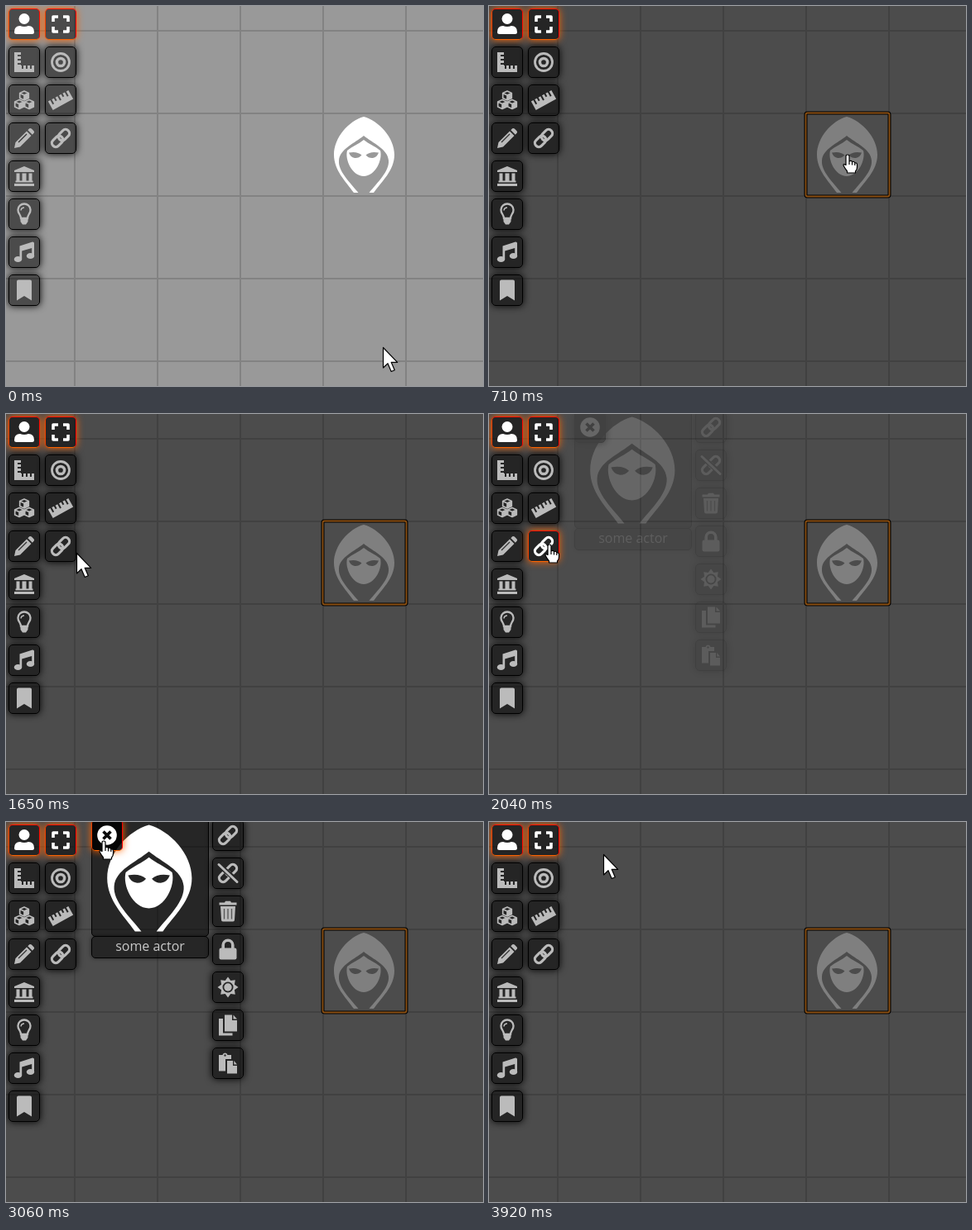
Animation of 576 by 460 pixels, one loop 4 s. Source, as an HTML page:

```html
<!DOCTYPE html>
<html lang="en">
<head>
<meta charset="utf-8">
<title>Token controls</title>
<style>
html, body { margin: 0; width: 100%; height: 100%; overflow: hidden; }
body { background: #4c4c4c; }
#stage { position: absolute; left: 0; top: 0; width: 576px; height: 460px; overflow: hidden; animation: scene 4s step-end infinite; }
svg { position: absolute; overflow: visible; }
.btn {
  position: absolute; box-sizing: border-box; width: 38px; height: 38px;
  border: 1px solid #000; border-radius: 5px; background: rgba(0,0,0,.51);
  box-shadow: 0 0 10px #000; color: #bbb;
}
.btn svg { left: 18px; top: 17.5px; width: 1px; height: 1px; fill: currentColor; }
.o { fill: none; stroke: currentColor; }
.on { color: #fff; border-color: #f10 #f00 #ff6400 #f04000; box-shadow: 0 0 10px #ff6400; }
.link { animation: link 4s step-end infinite; }
.close { background: rgba(0,0,0,.85); color: #fff; animation: close 4s step-end infinite; }
#token { animation: token 4s step-end infinite; }
#frame { animation: frame 4s step-end infinite; }
#hud { position: absolute; left: 0; top: 0; animation: hud 4s step-end infinite; }
.panel {
  position: absolute; left: 103px; width: 142px; box-sizing: border-box;
  border: 1px solid #000; border-radius: 5px; background: rgba(0,0,0,.5);
}
.name { top: 138px; height: 27px; text-align: center; color: #c9c9c9; font: 16px/23px "Open Sans", sans-serif; box-shadow: 0 0 5px rgba(0,0,0,.5); }
#cursor { left: 0; top: 0; width: 1px; height: 1px; animation: move 4s step-end infinite; }
#cursor path { fill: #fff; stroke: #000; stroke-width: 1.2; stroke-linejoin: round; }
#hand { animation: hand 4s step-end infinite; }
#arrow { animation: arrow 4s step-end infinite; }
#click { fill: rgba(250,240,0,.7); animation: click 4s step-end infinite; }

@keyframes scene { 0% { background: #999; } 17.75%, 100% { background: #4c4c4c; } }
@keyframes token { 0% { color: #fff; } 17.75%, 100% { color: #7f7f7f; } }
@keyframes frame {
  0% { visibility: hidden; color: #3de0e6; }
  7.75% { visibility: visible; color: #3de0e6; }
  17.75%, 100% { visibility: visible; color: #8a4f12; }
}
@keyframes hud { 0% { opacity: 0; } 51% { opacity: .15; } 53% { opacity: .65; } 55% { opacity: 1; } 92.25%, 100% { opacity: 0; } }
@keyframes link {
  0%, 62.75%, 100% { color: #bbb; border-color: #000; box-shadow: 0 0 10px #000; }
  43.25% { color: #fff; border-color: #f10 #f00 #ff6400 #f04000; box-shadow: 0 0 10px #ff6400; }
}
@keyframes close {
  0% { border-color: #000; box-shadow: 0 0 10px #000; }
  70.5%, 100% { border-color: #f10 #f00 #ff6400 #f04000; box-shadow: 0 0 10px #ff6400; }
}
@keyframes click { 0%, 17.75%, 51%, 92.25%, 100% { opacity: 0; } 15.75%, 49%, 90% { opacity: 1; } }
@keyframes hand { 0%, 29.5%, 61%, 92.25%, 100% { opacity: 0; } 7.75%, 43.25%, 70.5% { opacity: 1; } }
@keyframes arrow { 0%, 29.5%, 61%, 92.25%, 100% { opacity: 1; } 7.75%, 43.25%, 70.5% { opacity: 0; } }
@keyframes move {
  0% { transform: translate(455px,413px); }
  2% { transform: translate(453px,400px); }
  4% { transform: translate(447px,350px); }
  6% { transform: translate(440px,280px); }
  7.75% { transform: translate(436px,220px); }
  9.75% { transform: translate(433px,190px); }
  11.75% { transform: translate(433px,180px); }
  27.5% { transform: translate(420px,182px); }
  29.5% { transform: translate(370px,184px); }
  31.5% { transform: translate(300px,183px); }
  33.5% { transform: translate(230px,180px); }
  35.5% { transform: translate(170px,176px); }
  37.5% { transform: translate(125px,173px); }
  39.5% { transform: translate(96px,172px); }
  41.25% { transform: translate(85px,168px); }
  43.25% { transform: translate(76px,161px); }
  45.25% { transform: translate(73px,158px); }
  59% { transform: translate(77px,154px); }
  61% { transform: translate(91px,140px); }
  62.75% { transform: translate(103px,112px); }
  64.75% { transform: translate(113px,78px); }
  66.75% { transform: translate(117px,52px); }
  68.5% { transform: translate(117px,38px); }
  70.5% { transform: translate(116px,30px); }
  72.75% { transform: translate(116px,28px); }
  74.75% { transform: translate(117px,25px); }
  76.5% { transform: translate(118px,23px); }
  92.25% { transform: translate(118px,24px); }
  98%, 100% { transform: translate(138px,39px); }
}
</style>
</head>
<body>
<div id="stage">
  <svg width="576" height="460">
    <defs>
      <g id="hood" fill="currentColor" fill-rule="evenodd">
        <path d="M49 4C31 9 13 29 13 50C13 69 27 82 37 96H42.500C32 83 18 70 19 57C20 43 38 36 49 27C60 36 78 43 79 57C80 70 66 83 55.500 96H61C71 82 86 69 86 50C86 29 67 9 49 4Z"/>
        <path d="M49 32C43 37 35 40 29 45C26 56 35 76 49 76C63 76 72 56 69 45C63 40 55 37 49 32Z
          M31 47.500Q41 45.500 46.500 50.500Q43 54.500 38 54Q33 53 31 47.500Z
          M67 47.500Q57 45.500 51.500 50.500Q55 54.500 60 54Q65 53 67 47.500Z"/>
      </g>
    </defs>
    <path id="grid" stroke="#000" stroke-opacity=".15" stroke-width="2"/>
    <use id="token" href="#hood" x="383" y="130"/>
    <g id="frame" fill="none">
      <rect x="382.500" y="129.500" width="101" height="101" rx="2" stroke="#000" stroke-width="4"/>
      <rect x="382.500" y="129.500" width="101" height="101" rx="2" stroke="currentColor" stroke-width="1.800"/>
    </g>
  </svg>
  <div id="tools"></div>
  <div id="hud">
    <div class="panel" style="top:-5px;height:144px"></div>
    <svg width="576" height="460" color="#fff"><use href="#hood" transform="translate(104 -2) scale(1.400)"/></svg>
    <div class="panel name">some actor</div>
  </div>
  <svg id="cursor">
    <circle id="click" r="12"/>
    <path id="arrow" d="M.5.5V25L6 19.700L10.200 29.500L14.300 27.700L10.200 18.300H17.700Z"/>
    <path id="hand" d="M-2 2Q-2 0 0 0Q2 0 2 2V8Q4.500 6.500 5.500 8.800Q8 7.700 8.800 10Q11.500 9.300 11.500 12V15Q11.500 18 9.500 20V22H-.5V20Q-3 17 -5 13Q-5.300 10.500 -2 12.500ZM2 8V12M5.500 9V12.500M8.800 10V13"/>
  </svg>
</div>
<script>
const chain = '<g class="o" transform="rotate(-45)" stroke-width="3.200"><rect x="-13" y="-4.700" width="15" height="9.400" rx="4.700"/><rect x="-2" y="-4.700" width="15" height="9.400" rx="4.700"/></g>';
const cube = (x, y) => `<g transform="translate(${x} ${y})"><path class="o" stroke-width="1.700" stroke-linejoin="round" d="M0-5.500L5.300-3V3L0 5.500L-5.300 3V-3ZM-5.300-3L0-.5L5.300-3M0-.5V5.500"/><path d="M0-.5L5.300-3V3L0 5.500Z"/></g>`;
const spikes = Array.from({ length: 16 }, (_, i) => {
  const r = i % 2 ? 8.6 : 12.5, a = i * Math.PI / 8;
  return (r * Math.cos(a)).toFixed(1) + ',' + (r * Math.sin(a)).toFixed(1);
}).join(' ');

const icons = {
  user: '<circle cy="-6.500" r="6.500"/><path d="M-12 9.500Q-12 2-5 2Q0 4 5 2Q12 2 12 9.500Q12 12 9.500 12H-9.500Q-12 12-12 9.500Z"/>',
  expand: '<path class="o" stroke-width="3.600" stroke-linejoin="round" d="M-9-3V-9H-3M3-9H9V-3M9 3V9H3M-3 9H-9V3"/>',
  square: '<path d="M-12-12h8v3h-4v2h4v3h-4v2h4v3h-4v2h4v1h1v4h2v-4h3v4h2v-4h3v4h2v-4h3v8h-24z"/>',
  target: '<g class="o"><circle r="10.500" stroke-width="2.800"/><circle r="4.600" stroke-width="3.500"/></g>',
  cubes: cube(0, -5.5) + cube(-6, 5) + cube(6, 5),
  ruler: '<path transform="rotate(-29)" d="M-14-6h3v6h2v-6h3v4h2v-4h3v6h2v-6h3v4h2v-4h3v6h2v-6h3v12h-28z"/>',
  pencil: '<path d="M-12 12L-10.500 5L3-8.500L8.500-3L-5 10.500ZM4.300-9.800L6.200-11.700Q7.500-12.600 8.800-11.500L11.500-8.800Q12.600-7.500 11.700-6.200L9.800-4.300Z"/><path d="M-7 5L3-5" stroke="#333" stroke-width="1.200"/>',
  chain,
  temple: '<path d="M0-12L12-7V-5H-12V-7ZM-9.500-3.500h4v9h3v-9h5v9h3v-9h4v9h1v2h-21v-2h1zM-12 9h24v3h-24z"/>',
  bulb: '<path class="o" stroke-width="2.300" d="M-4 5Q-4 3-6-.5A7.500 7.500 0 1 1 6-.5Q4 3 4 5Z"/><path class="o" stroke-width="1.600" d="M-4-4.500Q-3.500-8 0-8"/><path d="M-4.500 6H4.500V9L2 12.500H-2L-4.500 9Z"/>',
  music: '<ellipse cx="-7.500" cy="8.500" rx="4.700" ry="3.600"/><ellipse cx="7.500" cy="4.500" rx="4.700" ry="3.600"/><path d="M-5.500-7.500L10-12.500Q12-12.500 12-11V4.500H9.200V-5L-2.800-1.500V8.500H-5.500Z"/>',
  mark: '<path d="M-9-10.500Q-9-12.500-7-12.500H7Q9-12.500 9-10.500V12.500L0 7L-9 12.500Z"/>',
  cut: chain + '<path class="o" stroke="#262626" style="stroke:#262626" stroke-width="6" d="M-11-10L12 10"/><path class="o" stroke-width="3" stroke-linecap="round" d="M-11-10.500L11 10.500"/>',
  trash: '<path d="M-10.500-10.500h6.500l1-1.800h6l1 1.800h6.500v3h-21zM-9-6H9L8 10.500Q8 12.500 6 12.500H-6Q-8 12.500-8 10.500Z"/><path stroke="#555" stroke-width="1.300" d="M-4.500-3V9.500M0-3V9.500M4.500-3V9.500"/>',
  lock: '<rect x="-10.500" y="-1.500" width="21" height="14" rx="2.200"/><path class="o" stroke-width="3.600" d="M-5.800 0V-5A5.800 5.800 0 0 1 5.800-5V0"/>',
  sun: `<path fill-rule="evenodd" d="M${spikes}ZM6.500 0a6.500 6.500 0 1 0-13 0a6.500 6.500 0 1 0 13 0"/><circle r="4.700"/>`,
  copy: '<path d="M-4-12.500H5V-6H11V7.500H-4ZM6.500-12.500L11-7.500H6.500ZM-11-8H-6V9.500H5.500V12.500H-11Z"/>',
  paste: '<path d="M-11-10H-6.500Q-6-12.500-3.500-12.500Q-1-12.500-.5-10H4V-5H-3V9.500H-11ZM-1-3H6V3H11V12.500H-1ZM7.300-3L11 1.500H7.300Z"/><circle cx="-3.500" cy="-9.500" r="1.200" fill="#333"/>',
  close: '<circle r="11.800"/><path stroke="#0a0a0a" stroke-width="3.600" d="M-4.500-4.500L4.500 4.500M4.500-4.500L-4.500 4.500"/>'
};

const $ = id => document.getElementById(id);
const button = (box, name, x, y, cls = '') => box.insertAdjacentHTML('beforeend',
  `<div class="btn ${cls}" style="left:${x}px;top:${y}px"><svg>${icons[name]}</svg></div>`);
const column = (box, names, x, y) => names.split(' ').forEach((item, i) => {
  const [name, cls] = item.split(':');
  button(box, name, x, y + i * 46, cls);
});

let grid = '';
for (let i = 0; i < 5; i++) grid += `M${83 + i * 100} 0V460M0 ${30 + i * 100}H576`;
$('grid').setAttribute('d', grid);

column($('tools'), 'user:on square cubes pencil temple bulb music mark', 3, 3);
column($('tools'), 'expand:on target ruler chain:link', 47, 3);
column($('hud'), 'chain cut trash lock sun copy paste', 249, -3);
button($('hud'), 'close', 103, -3, 'close');
</script>
</body>
</html>
```
